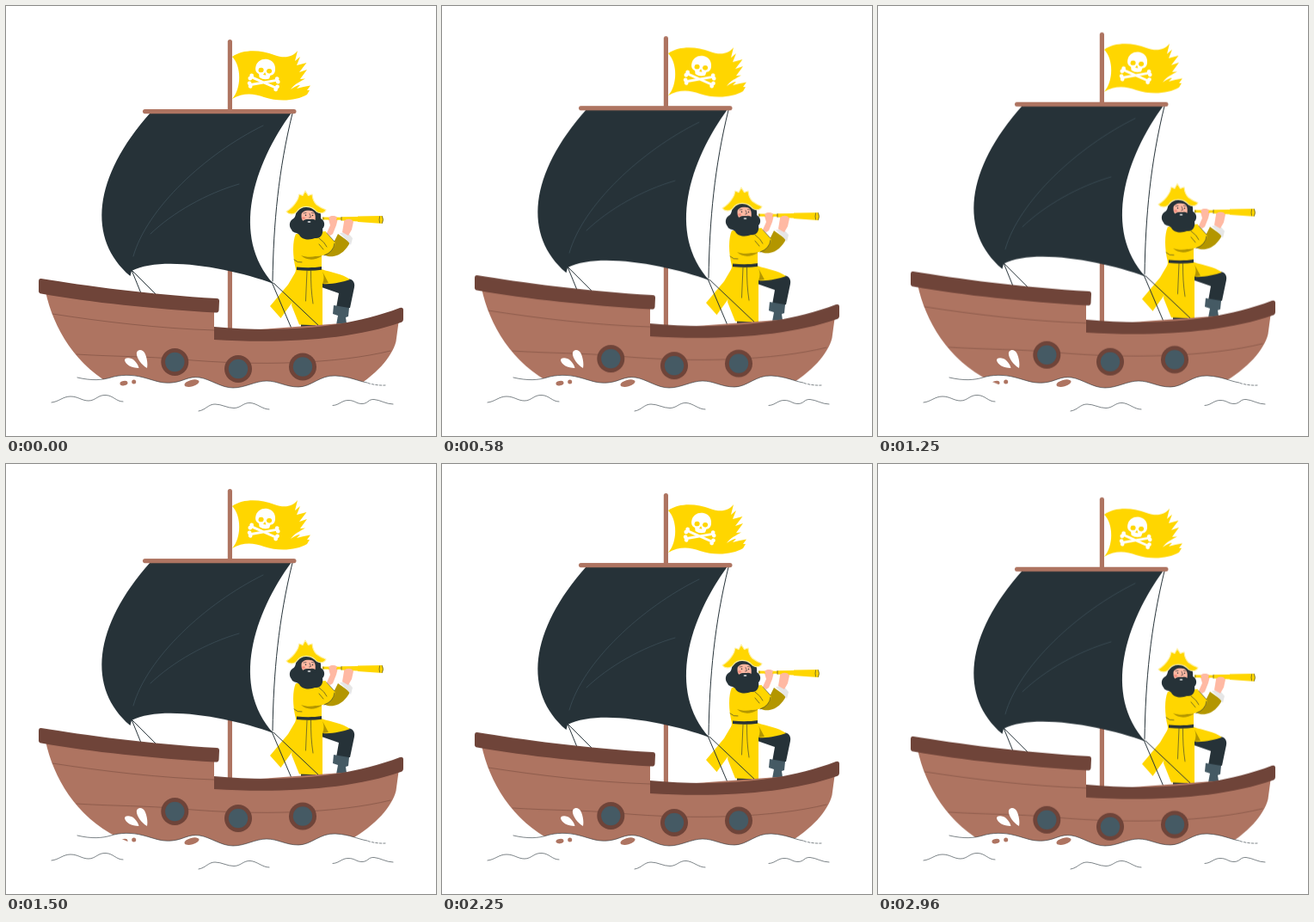
Recreate the animation shown at these times as an HTML page. Size 500 by 500 pixels, loop 3000 ms.

```html
<!DOCTYPE html>
<html lang="en">
<head>
<meta charset="utf-8">
<title>Pirate ship</title>
<style>
  html, body { margin: 0; width: 100%; height: 100%; overflow: hidden; background: #fff; }
  svg { display: block; width: 100%; height: 100%; }
  .ship { animation: bob 1.5s linear infinite alternate; }
  @keyframes bob { to { transform: translateY(-10px); } }
  .wood { fill: #ae7461; }
  .trim { fill: #6f4439; }
  .dark { fill: #263238; }
  .blue { fill: #455a64; }
  .gold { fill: #ffd600; }
  .shade { fill: #b39600; }
  .skin { fill: #ffb9a3; }
  .white { fill: #fff; }
  .line { fill: none; stroke: #263238; stroke-linecap: round; stroke-linejoin: round; }
  .rope { stroke-width: 1; }
  .thin { stroke-width: .6; }
  .crease { stroke: #455a64; stroke-width: .6; }
  .plank { stroke: #6f4439; stroke-width: .5; }
  .bone { fill: none; stroke: #fff; stroke-width: 3; }
</style>
</head>
<body>
<svg viewBox="0 0 500 500" xmlns="http://www.w3.org/2000/svg">
  <defs>
    <g id="port">
      <circle r="16" class="trim"/>
      <circle r="11.2" class="blue"/>
    </g>
    <mask id="gaps" maskUnits="userSpaceOnUse" x="0" y="400" width="500" height="100">
      <rect y="400" width="500" height="100" fill="#fff"/>
      <ellipse cx="137" cy="438.6" rx="4.6" ry="2.6" transform="rotate(-12 137 438.6)"/>
      <circle cx="148.7" cy="436.9" r="2.5"/>
      <ellipse cx="216" cy="438.6" rx="8.8" ry="3.8" transform="rotate(-15 216 438.6)"/>
    </mask>
  </defs>

  <g class="ship">
    <rect x="257.8" y="39" width="5.2" height="345" rx="2.6" class="wood"/>

    <!-- flag -->
    <path class="gold" d="M263 59C276 50 296 51 312 57C323 61 333 60 339 52L336 64L342 59L338 69L349.5 66L341 77L350 74L342 85L348 84.500C342 88 335 91 331 97C335 94 339 92 342 92L338 96L346 94L354 92.500L350 98L353 98L350 103C338 110 318 112 300 106C287 101 275 101 263 108C274 96 274 70 263 59Z"/>
    <g transform="translate(301 78) rotate(7) scale(.96)">
      <path class="white" d="M-12 -5C-12 -13 -6 -17 0 -17S12 -13 12 -5C12 -1 10 1 7 2L6 6Q0 9 -6 6L-7 2C-10 1 -12 -1 -12 -5Z"/>
      <g class="gold">
        <ellipse cx="-5" cy="-3" rx="3.2" ry="2.9"/>
        <ellipse cx="5" cy="-3" rx="3.2" ry="2.9"/>
        <path d="M0 -1L1.800 2.400H-1.800Z"/>
      </g>
      <path class="bone" d="M-15 7L15 16M-15 16L15 7"/>
      <g class="white">
        <circle cx="-15.500" cy="5" r="2.500"/><circle cx="-17" cy="8.500" r="2.500"/>
        <circle cx="17" cy="14.500" r="2.500"/><circle cx="15.500" cy="18" r="2.500"/>
        <circle cx="-17" cy="14.500" r="2.500"/><circle cx="-15.500" cy="18" r="2.500"/>
        <circle cx="15.500" cy="5" r="2.500"/><circle cx="17" cy="8.500" r="2.500"/>
      </g>
    </g>

    <!-- sail -->
    <path class="line rope" d="M146 307L157 334M146 307L174 335M333 125C317 190 311 252 310 320"/>
    <path class="dark" d="M168 124H332C288 184 261 268 311 323C262 305 182 290 146 308L144.500 314C94 271 101 199 168 124Z"/>
    <path class="line crease" d="M148 291C164 235 232 172 299 139M168 265C194 240 233 218 271 207"/>
    <rect x="159" y="120" width="178.500" height="5.2" rx="2.6" class="wood"/>

    <!-- far arm, legs -->
    <path class="shade" d="M386 265L400 275C396 283 389 290 381 291C375 292 369 290 367 287L379 279Z"/>
    <path d="M388 264L397 263L403 270L401 278L397 273Z" fill="#e6e6e6"/>
    <path class="skin" d="M391 263L393 251C394 247 403 247 404 251L402 260L398 267Z"/>
    <path class="dark" d="M343 368H360V378H343ZM366 314L396 317C403 317 406 321 405 327L400 351H384L387 334L367 327Z"/>
    <path class="blue" d="M381 348L399 351L398 361L395 362L397 376H383L386 360L380 358Z"/>

    <!-- coat -->
    <path class="gold" d="M338 307L328 324L307 349L319.500 363L334 343L344 318Z"/>
    <path class="gold" d="M337 265C333 273 333 291 337 306L335 325L332 348L341 370.500L368 371.500V323C379 324 391 321 400 318C391 311 378 310 367 306V290L372 262Z"/>
    <path class="shade" d="M343 290C351 293 361 292 367 288V291C359 296 349 296 343 290ZM368 309C370 314 370 318 368 323L375 322Z"/>
    <path class="dark" d="M338 303.500C348 304.500 358 304.500 367 303V306.800C358 308 348 308 338 307Z"/>
    <path class="line thin" d="M350 308L348.500 343M354.500 308C354.500 322 355 333 357 346M335 295Q339 299 344 298"/>
    <path class="gold" d="M338 265L364 269L372 263L383 275C381 286 371 291 361 291C350 291 341 286 337 282Z"/>
    <path class="line thin" d="M364 270Q371 275 373 280M364 277L369 283M382 276Q381 286 370 290M373 264L382 274"/>
    <path class="skin" d="M373 264L377 255L375 248C376 243 384 243 386 247L384 255L380 265L377 267Z"/>

    <!-- head -->
    <path class="dark" d="M340 234C336 240 338 246 333 248C328 252 330 258 332 260C333 264 338 263 341 266C344 273 355 272 359 270C367 271 369 264 368 259C372 255 370 249 366 247C367 241 364 236 361 233Z"/>
    <path class="skin" d="M343.500 243C343.500 239 349 237 354 238C359 238 360.500 243 359.500 249.500C355 247.500 349 247.500 345.500 250C343.500 248 343.500 246 343.500 243Z"/>
    <path d="M344 246.500a2 1.600 0 1 0 4 0a2 1.600 0 1 0 -4 0" fill="#f48f80"/>
    <path class="line thin" d="M346 241L349 240.500M355.500 240.500L358 241M353 241.500L354.500 245.500L352.500 246"/>
    <circle cx="348.500" cy="243.300" r=".8" class="dark"/>
    <circle cx="356.500" cy="243.500" r=".8" class="dark"/>
    <path class="dark" d="M344 251C347 247.500 351 247.500 353 248.500C356 247 360 248 362 252L353 250.500Z"/>
    <ellipse cx="352.500" cy="251" rx="2" ry=".8" class="white"/>
    <path d="M326 239C331 236 335 232 338 227C341 223 340 220 341 219L345 220.500L348 215L351.500 220.500L356 219C356.500 225 358 228 361 231C365 234 369 236 372 237C370 242 363 242 359 237C353 232 344 232 339 238C336 243 329 243 326 239Z" fill="#ffd600" stroke="#fff0a0" stroke-width="1.200" stroke-linejoin="round"/>

    <!-- spyglass -->
    <path class="gold" d="M368 245.500L390 245.800V245.300L409 245V244.500L437.500 244Q440 248.500 437.500 253L409 251V250.500L390 249.500V248.800L368 248.500Z"/>
    <path class="line thin" d="M369 246V248.300M390 245.500V249.300M434.500 244.800Q433.500 248.500 434.500 252"/>
    <path class="line thin" d="M437.500 244.500Q439.500 248.500 437.500 252.500"/>
    <path class="skin" d="M375 246Q379 242 385 246L383 251L377 250ZM393 250Q397 246 403 249L401 256L394 257Z"/>

    <path class="line rope" d="M309 321L332 375M311 322L366 374"/>

    <!-- hull -->
    <path class="wood" d="M46 332C55 374 81 420 130 444L158 456H375L400 447C430 430 449 408 453.500 390L457 364L242 380V350Z"/>
    <path class="line plank" d="M54 358C112 367 178 375 242 377M82 405C130 408 160 407 205 411C295 419 385 416 447 401"/>
    <path class="trim" d="M242 373C320 380 395 375 458 351Q462 350 462 353.500V364Q462 367 459 368C402 388 320 393 242 388Z"/>
    <path class="trim" d="M41 317C90 325 170 336 245 340Q248 340 248 343L247.500 354Q247 357 243 356.500C170 352 100 345 41 334.500Q38 334 38 331.500V320Q38 316.500 41 317Z"/>
    <use href="#port" x="196.300" y="414"/>
    <use href="#port" x="270" y="422"/>
    <use href="#port" x="345" y="419.500"/>
  </g>

  <!-- water -->
  <path class="white" mask="url(#gaps)" d="M83 432C100 436 112 435 122 432S145 428 160 432S180 439 193 438S212 430 225 432S250 444 264 444S290 436 303 436S325 443 340 443S365 429 383 430S408 436 420 438L460 442V500H60V432Z"/>
  <g class="line thin">
    <path d="M83 432C100 436 112 435 122 432S145 428 160 432S180 439 193 438S212 430 225 432S250 444 264 444S290 436 303 436S325 443 340 443S365 429 383 430S408 436 420 438"/>
    <path stroke-dasharray="2.500 2" d="M421 438.500Q431 441.500 441 441"/>
    <path d="M53 461C62 460 66 454 75 454S88 459 96 459S107 452 116 452.500S128 460 136 460"/>
    <path d="M224 471C232 470 235 463 243 463S257 467.500 265 467.500S276 461 284 461.500S298 469 306 469"/>
    <path d="M380 464.500C388 464 390 458.500 398 458.500S407 462.500 414 462.500S421 457 428 457.500S442 463 450 463"/>
  </g>
  <path class="white" d="M154.500 421C146 421 139 417 138 412C138 408 146 409 149 412C152 415 154 418 154.500 421ZM164 421C157 417 151 408 152 403C154 398 160 400 162 405C164 410 165 416 164 421Z"/>
</svg>
</body>
</html>
```
